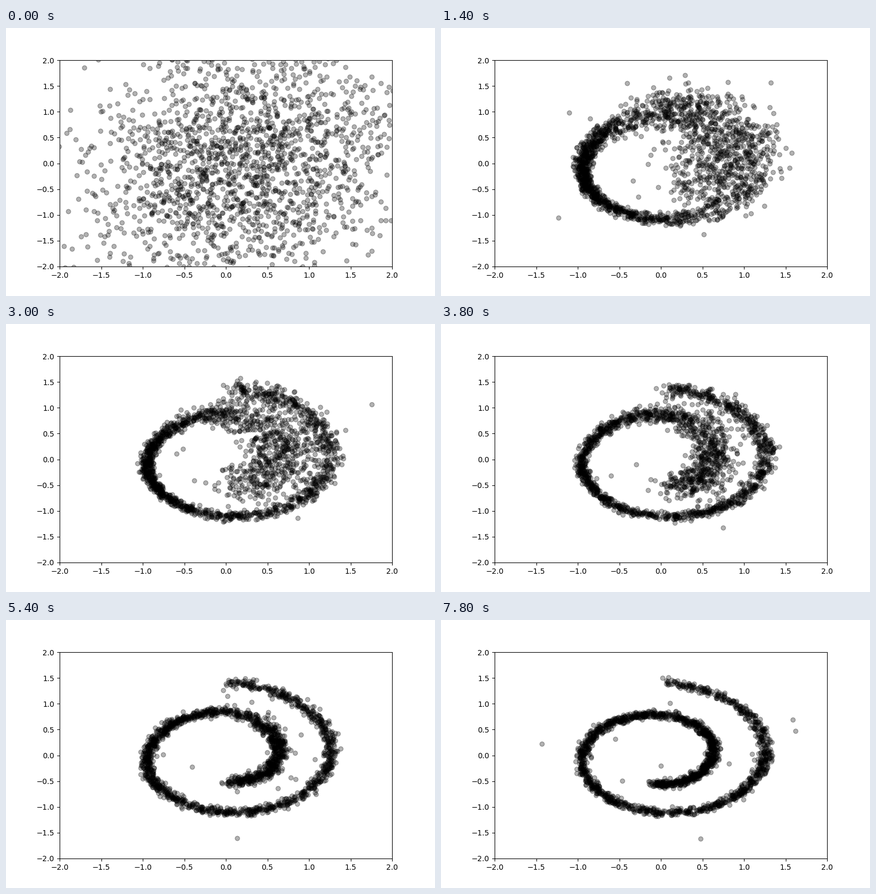
Write a matplotlib script that moves like this. It is 800 px wide and 500 px high and loops after 8 s.

```python
import numpy as np
import matplotlib.pyplot as plt
from matplotlib.animation import FuncAnimation

FRAMES = 40
COUNT = 2000
STEP_MS = 200
FORMED = 7          # step at which the cloud has become a rough ring
TURN = 2 * np.pi


def ramp(t, middle, width):
    """Smooth step from 0 to 1 around an angle."""
    return 1 / (1 + np.exp((middle - t) / width))


def bump(t, middle, width):
    return np.exp(-((t - middle) / width) ** 2)


def spiral(t, scale=1):
    return np.column_stack([np.cos(t), np.sin(t)]) * (t * scale / 10)[:, None]


def noise_cloud(rng):
    y = rng.normal(0, 1.22, COUNT)
    x = rng.normal(.2, .9, COUNT) + .12 * y
    return np.column_stack([x + .04 * np.sin(11 * y + 3 * x),
                            y + .04 * np.sin(11 * x)])


def sample(k):
    rng = np.random.default_rng(400 + k)
    cloud = noise_cloud(rng)
    if k == 0:
        return cloud

    age = max(0, k - FORMED)
    done = age / (FRAMES - 1 - FORMED)

    # Early on, many points crowd the left arc, which settles first.
    t = rng.uniform(5.25 - .75 * done, 14.1, COUNT)
    crowd = rng.random(COUNT) < .32 * np.exp(-age / 7)
    t[crowd] = rng.normal(9.6, .75, crowd.sum())

    inner = 1 - ramp(t, 7.8, .3)
    outer = ramp(t, 11.9, .5)
    left = bump(t, 8.5, .8)

    radius = (1 + .2 * (1 - done) * bump(t, 7.8, .6)
              + .2 * done * bump(t, 4.5, .7)
              - .08 * outer * np.exp(-age / 5))
    spread = (.038 + .26 * inner * np.exp(-(age / 12) ** 2)
              + .15 * outer * np.exp(-age / 7)
              + .04 * left * np.exp(-age / 6))
    points = spiral(t, radius)

    # Unresolved points lie between the outer turn and the inner one.
    loose = rng.random(COUNT) < .2 * np.exp(-age / 8)
    edge = 14.14 - 2.7 * rng.random(COUNT) ** 1.4
    mix = rng.random((COUNT, 1))
    between = spiral(edge) * (1 - mix) + spiral(edge - TURN) * mix
    points[loose] = between[loose]
    points += rng.normal(size=(COUNT, 2)) * spread[:, None]

    # A few strays land far from the curve.
    n = rng.integers(6, 11)
    points[:n] = spiral(rng.uniform(8, 14, n)) + rng.normal(0, .45, (n, 2))

    blend = max(0, 1 - k / FORMED) ** 2
    return points * (1 - blend) + cloud * blend


fig, ax = plt.subplots(figsize=(8, 5), dpi=100)
ax.set_xlim(-2, 2)
ax.set_ylim(-2, 2)
dots = ax.scatter([], [], color="black", alpha=.3)


def update(k):
    dots.set_offsets(sample(k))
    return (dots,)


anim = FuncAnimation(fig, update, frames=FRAMES, interval=STEP_MS,
                     repeat=True, repeat_delay=0)
plt.show()
```
